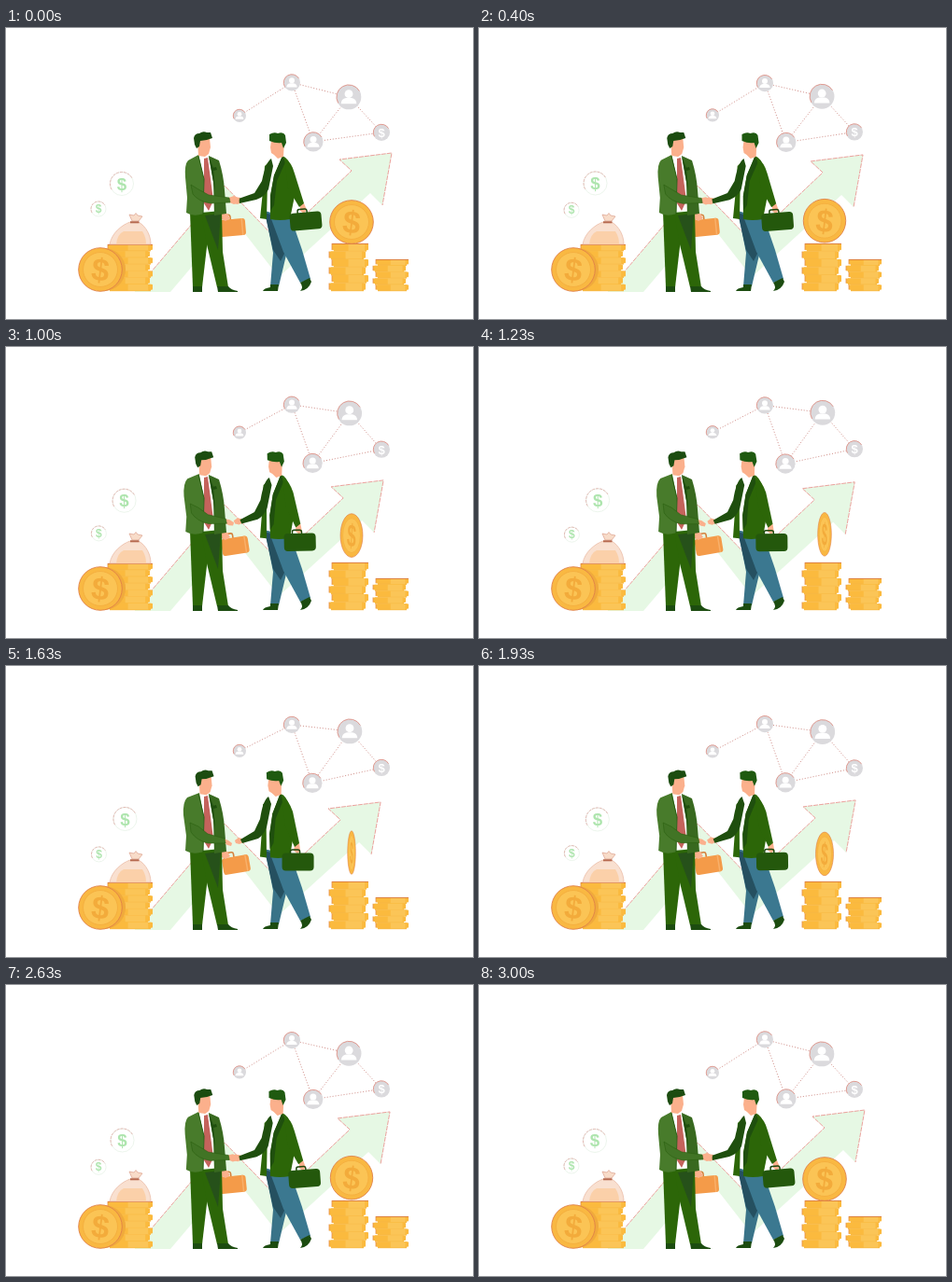
An HTML page that plays this animation: 500 by 312 pixels, repeating every 3.03 s.

```html
<!DOCTYPE html>
<html lang="en">
<head>
<meta charset="utf-8">
<title>Business deal</title>
<style>
html, body { margin: 0; width: 100%; height: 100%; overflow: hidden; background: #fff; }
svg { display: block; width: 100%; height: 100%; }
text { font-family: "Liberation Sans", Arial, sans-serif; font-weight: bold; text-anchor: middle; }
.dark { fill: #1f4f0e; }
.mid { fill: #2c6608; }
.light { fill: #487b2b; }
.hair { fill: #1c4c10; }
.skin { fill: #fbb08c; }
.edge { fill: none; stroke: #eba29d; stroke-width: 1; stroke-dasharray: 5 1; }
.link { stroke: #cf8a84; stroke-width: 1; stroke-dasharray: 1 2; }
</style>
</head>
<body>
<svg viewBox="0 0 500 312">
  <defs>
    <g id="coin">
      <circle r="23.3" fill="#f9b842" stroke="#e08149" stroke-width=".9"/>
      <circle r="18.500" fill="#fbc455" stroke="#f5b040"/>
      <text y="12" font-size="34" fill="#f3ab3b" transform="rotate(7)">$</text>
    </g>
    <g id="person" fill="#fff">
      <circle cy="-3" r="4"/>
      <path d="M-7.5 6.5C-7 1 -3 1 0 1S7 1 7.5 6.5Z"/>
    </g>
  </defs>

  <path id="arrow" fill="#e6f8e4"/>
  <path id="arrowEdge" class="edge"/>

  <g id="links"></g>
  <g id="nodes"></g>
  <g id="bubbles"></g>
  <g id="stacks"></g>

  <!-- money bag -->
  <path d="M111 232C113 220 124 211 133 208H142C150 213 155 222 155 232Z" fill="#f9e0d0" stroke="#e9b6a0" stroke-width=".7"/>
  <path d="M118 232Q119 221 126 218H146Q150 224 150 232Z" fill="#fbd0a9"/>
  <path d="M135 207L132 200L137 201L139 198.500L141 201L146 202L142 207Z" fill="#f8dcc9" stroke="#dba08c" stroke-width=".7"/>
  <path d="M133 208.300H142.500" stroke="#b76a50" stroke-width="2"/>

  <circle cx="105" cy="259" r="23" fill="#f0aa3c"/>
  <use href="#coin" x="101" y="259"/>
  <use href="#coin" id="spin"/>

  <!-- left man -->
  <g id="caseL">
    <path d="M-11 -8V-12Q-11 -14 -9 -14H-3Q-1 -14 -1 -12V-8" fill="none" stroke="#d5813c" stroke-width="1.600"/>
    <rect x="-14.500" y="-9" width="29" height="18" rx="3" fill="#f49b49"/>
    <path d="M11 -9V9" stroke="#f8b06a" stroke-width="1.500"/>
  </g>
  <path d="M230 197L237 199L240 204L235 207L231 205Z" class="skin"/>
  <path d="M197 197L214 200L216 226L210 278H200Z" class="mid"/>
  <path d="M209 198L231 196L232 240L238 278H226L215 232Z" class="mid"/>
  <path d="M213 201L230 199L227 238Z" fill="#26511a"/>
  <path d="M200 277H210V283H200Z" class="hair"/>
  <path d="M226 277H238Q241 281 248 282V283H227Z" class="hair"/>
  <path d="M205 137H219L225 165L223 196L209 197Z" fill="#fff"/>
  <path d="M212 140L216 139L222 185L217 196L212 188Z" fill="#c4635c"/>
  <path d="M217 137L228 142Q233 158 234 174L236 199L223 201L222 165Z" fill="#38691f"/>
  <path d="M217 137L222 150L224 175L222 165Z" class="dark"/>
  <path d="M221 150L225 149L226 152L222 153Z" class="dark"/>
  <path id="jacketL" class="light"/>
  <path d="M206 137L212 162L211 199" fill="none" stroke="#285d13" stroke-width="1"/>
  <g id="headL">
    <path d="M205 121L218 118L219 128L217 135L213 138L206 137Z" class="skin"/>
    <path d="M202 125L201 118Q202 113 207 113Q211 110 215 112L219 112L221 118Q214 121 208 121L207 127L204 129Z" class="hair"/>
  </g>

  <!-- right man -->
  <path d="M277 196L301 203L302 235L292 277H283L286 241Z" fill="#397388"/>
  <path d="M277 198L289 202L300 238L294 250L286 238Z" fill="#255060"/>
  <path d="M283 202L304 200L317 238L326 269L315 273L297 240Z" fill="#3b7890"/>
  <path d="M283 275H292L291 282H275Q276 279 283 278Z" class="hair"/>
  <path d="M315 273L325 268L327 272Q324 281 315 282Q319 278 315 273Z" class="hair"/>
  <g id="bodyR">
    <path d="M285 138L296 136L299 160L288 197L278 196L279 155Z" fill="#fff"/>
    <path d="M284 141L277 148L275 175L272 204L279 205L280 165Z" class="mid"/>
    <path d="M296 137Q303 140 305 150L309 180L304 205Q293 207 283 205L283 180L287 158Z" class="mid"/>
    <path d="M296 137L299 144L290 164L287 190L283 196L283 180L287 158Z" class="dark"/>
    <path d="M284 121L298 121L297 138L291 140L287 136L284 134L283 128Z" class="skin"/>
    <path d="M282 121V114Q287 111 291 113Q297 111 299 115L300 123L297 129L295 123Q289 124 282 121Z" fill="#1f5a10"/>
  </g>
  <path id="handR2" class="skin"/>
  <path id="sleeveR2" class="mid"/>
  <g id="caseR">
    <path d="M-8 -8V-11Q-8 -13 -6 -13H0Q2 -13 2 -11V-8" fill="none" stroke="#1d480d" stroke-width="1.500"/>
    <rect x="-17" y="-9.500" width="34" height="19" rx="4" fill="#24580c"/>
  </g>

  <!-- handshake -->
  <path id="handR" class="skin"/>
  <path id="sleeveR" class="dark"/>
  <path id="handL" class="skin"/>
  <path id="sleeveL" fill="#417425" stroke="#2a6010" stroke-width=".6"/>
</svg>
<script>
const LOOP = 3030, FRAMES = 91;
const $ = id => document.getElementById(id);
const mix = (a, b, p) => a + (b - a) * p;

function add(parent, tag, attrs, text) {
  const el = document.createElementNS("http://www.w3.org/2000/svg", tag);
  for (const k in attrs) el.setAttribute(k, attrs[k]);
  if (text) el.textContent = text;
  return parent.appendChild(el);
}

// Blend two paths with the same commands.
function blend(a, b, p) {
  const to = b.match(/-?[\d.]+/g);
  let i = 0;
  return a.replace(/-?[\d.]+/g, n => mix(+n, +to[i++], p).toFixed(2));
}

// Coin piles: left, top, width, layers, shift of the first layer
function stack(x, y, w, n, first) {
  const h = (282 - y) / n, cw = w - 3, box = $("stacks");
  for (let i = 0; i < n; i++) {
    const cx = x + ((i + first) % 2 ? 3 : 0), cy = y + i * h;
    add(box, "rect", { x: cx + 2, y: cy, width: cw - 4, height: h + .2, fill: "#f8b842" });
    add(box, "rect", { x: cx, y: cy, width: cw, height: h - 1.2, rx: 1, fill: "#fbba3e" });
    add(box, "rect", { x: cx + cw * .45, y: cy, width: cw * .45, height: h - .6, fill: "#fbc557" });
    add(box, "path", { d: `M${cx} ${cy}v${h - 1.5}`, stroke: "#e58d48", "stroke-width": .8 });
  }
  add(box, "path", { d: `M${x + first * 3} ${y + .4}h${cw}`, stroke: "#d9793f", "stroke-width": .9 });
}
stack(106, 232, 51, 7, 1);
stack(346, 231, 42, 6, 1);
stack(393, 248, 38, 5, 1);

// Network: x, y at both ends of the swing, radius
const nodes = [
  [250, 94, 250, 91, 7], [306, 58.5, 306, 63, 9], [367, 74, 368, 70, 13.3],
  [329, 122, 328, 125.5, 10.5], [402, 112, 402, 109, 9]
];
const links = [[0, 1], [1, 2], [1, 3], [2, 3], [3, 4], [2, 4]];
const bubbles = [[124, 167, 127.5, 164, 12.5], [99, 194, 99.5, 202, 8]];

const rim = r => `M${-r * .87} ${r * .5}A${r} ${r} 0 1 1 ${r * .87} ${-r * .5}`;

const linkEls = links.map(() => add($("links"), "line", { class: "link" }));
const nodeEls = nodes.map(([, , , , r], i) => {
  const g = add($("nodes"), "g", {});
  add(g, "circle", { r, fill: "#dbdadd" });
  add(g, "path", { d: rim(r - .3), fill: "none", stroke: "#e29c92", "stroke-width": 1 });
  if (i == 4) add(g, "text", { y: 4.8, "font-size": 13, fill: "#fff" }, "$");
  else add(g, "use", { href: "#person", transform: `scale(${r / 12})` });
  return g;
});
const bubbleEls = bubbles.map(([, , , , r]) => {
  const g = add($("bubbles"), "g", {});
  add(g, "circle", { r, fill: "#fff", stroke: "#e8f3e8", "stroke-width": .8 });
  add(g, "path", { d: rim(r), fill: "none", stroke: "#dfaaa5", "stroke-width": .8, "stroke-dasharray": "3 1" });
  add(g, "text", { y: r * .52, "font-size": r * 1.5, fill: "#aee5ae" }, "$");
  return g;
});

const morphs = {
  jacketL: [
    "M206 136L195 142Q191 146 192 160L194 182L193 198Q201 203 211 199L212 162Z",
    "M207 136L194 141Q189 146 190 160L193 182L192 198Q201 203 211 199L212 162Z"],
  sleeveL: [
    "M198 168L206 173L217 179L239 182L240 187L219 188Q206 186 200 178Z",
    "M197 168L206 172L216 180L234 185L235 190L216 190Q204 187 198 178Z"],
  handL: [
    "M238 182L244 180L250 183L249 187L244 189L239 187Z",
    "M233 185L238 187L242 190L241 193L237 192L234 190Z"],
  sleeveR: [
    "M284 140L286 148L281 173Q277 181 268 184L250 188L249 183L266 177L274 164Q278 144 284 140Z",
    "M281 140L284 148L279 173Q276 181 270 185L253 190L251 186L266 177L272 164Q275 144 281 140Z"],
  handR: [
    "M251 182L245 181L240 184L243 188L248 189L252 187Z",
    "M253 185L249 184L245 187L246 190L250 191L254 189Z"],
  sleeveR2: [
    "M298 139Q306 144 309 156L319 188L314 192L302 172Z",
    "M295 139Q303 144 307 156L314 190L309 194L299 172Z"],
  handR2: [
    "M315 189L319 188L322 195L319 199L315 196Z",
    "M309 192L314 190L315 198L312 201L308 198Z"]
};

const place = (id, x, y, more = "") => $(id).setAttribute("transform", `translate(${x} ${y}) ${more}`);

function drawArrow(p) {
  const at = (x, y) => `${x - 12 * p} ${y + 12 * p}`;
  const top = `M138 282L234 169L291 228L${at(370, 153)}L${at(357, 141)}L${at(413, 134)}`;
  $("arrow").setAttribute("d", `${top}L${at(403, 190)}L${at(390, 177)}L292 267L243 204L176 283H138Z`);
  $("arrowEdge").setAttribute("d", `${top}L${at(403, 190)}`);
}

function draw(p) {
  drawArrow(p);
  for (const id in morphs) $(id).setAttribute("d", blend(...morphs[id], p));

  const spot = ([x0, y0, x1, y1]) => [mix(x0, x1, p), mix(y0, y1, p)];
  const pos = nodes.map(spot);
  nodeEls.forEach((el, i) => el.setAttribute("transform", `translate(${pos[i]})`));
  bubbleEls.forEach((el, i) => el.setAttribute("transform", `translate(${spot(bubbles[i])})`));
  links.forEach(([a, b], i) => {
    const [x1, y1] = pos[a], [x2, y2] = pos[b];
    for (const [k, v] of Object.entries({ x1, y1, x2, y2 })) linkEls[i].setAttribute(k, v);
  });

  place("spin", 370, mix(208, 200, p), `scale(${Math.cos(p * 80 * Math.PI / 180)} 1)`);
  place("caseL", mix(242, 246.5, p), mix(214, 213, p), `rotate(${mix(-5, -10, p)})`);
  place("caseR", mix(321, 312.5, p), mix(207, 210, p), `rotate(${mix(-5, 0, p)})`);
  place("headL", 1.6 * p, .3 * p);
  $("bodyR").setAttribute("transform", `rotate(${-2 * p} 290 205)`);
}

const start = performance.now();
function tick() {
  const t = Math.max(0, performance.now() - start) % LOOP;
  const step = Math.floor(t / LOOP * FRAMES + .01);
  draw((1 - Math.cos(step / FRAMES * 2 * Math.PI)) / 2);
  requestAnimationFrame(tick);
}
tick();
</script>
</body>
</html>
```
